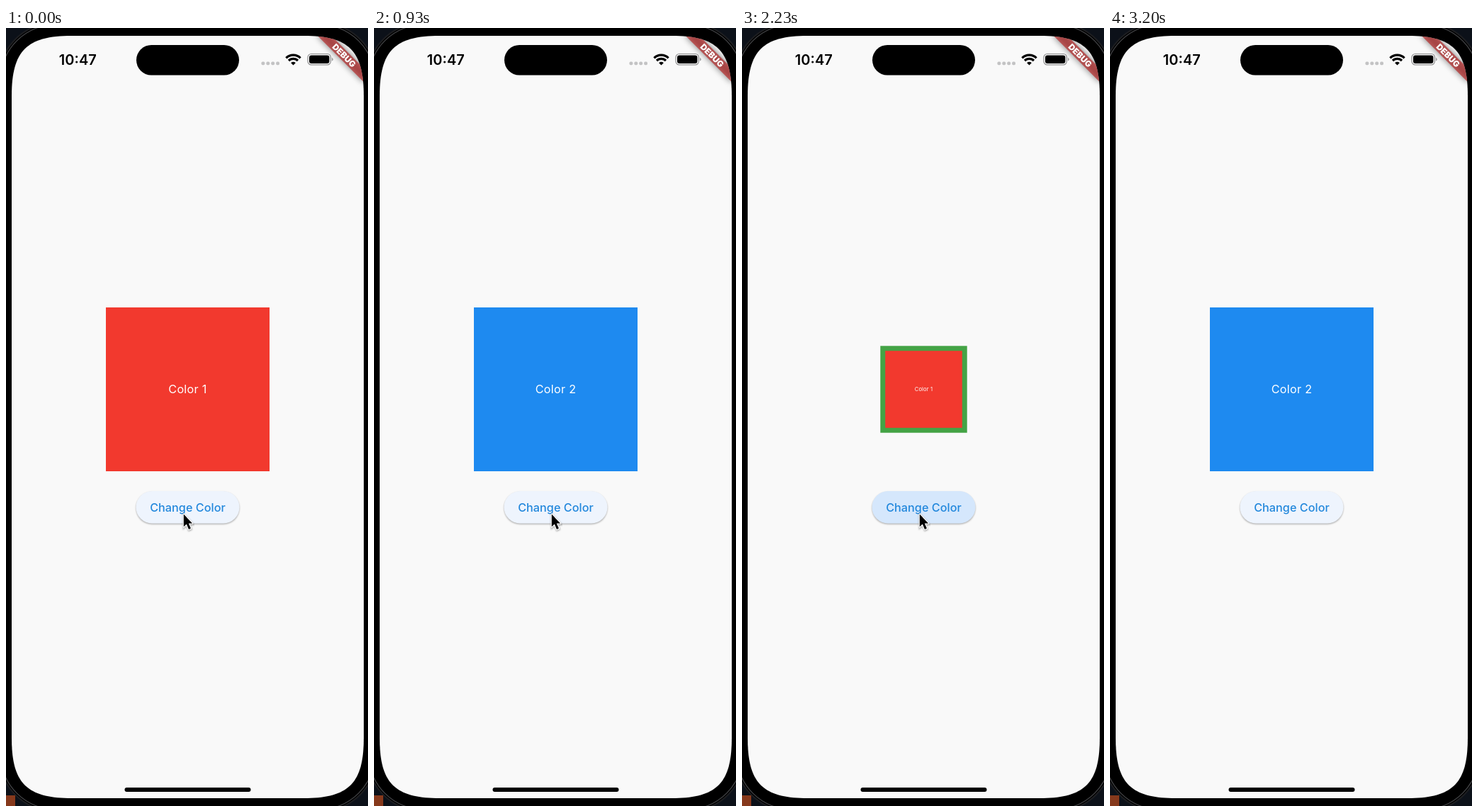
An HTML page that plays this animation: 511 by 1097 pixels, repeating every 3930 ms.

```html
<!DOCTYPE html>
<html lang="en">
<head>
<meta charset="utf-8">
<title>Change Color</title>
<style>
  html, body { margin: 0; width: 100%; height: 100%; overflow: hidden; background: #000; }
  svg { display: block; width: 100%; height: 100%; }
  text { font-family: Inter, "Open Sans", sans-serif; text-anchor: middle; }
  .label { font-size: 16.15px; letter-spacing: .32px; fill: #fff; }
  .action { font-size: 16.15px; font-weight: 500; letter-spacing: .06px; fill: #2187dc; }
  .clock { font-size: 20px; font-weight: 600; }
  .debug { font-size: 11.8px; font-weight: 900; fill: #fff; }
</style>
</head>
<body>
<svg viewBox="0 0 511 1097" xmlns="http://www.w3.org/2000/svg">
  <defs>
    <clipPath id="screenClip">
      <path id="screen" d="M8 96C8 32 29 11 93 11H420C484 11 505 32 505 96V1001C505 1065 484 1086 420 1086H93C29 1086 8 1065 8 1001Z"/>
    </clipPath>
    <clipPath id="buttonClip"><rect x="183.5" y="653" width="146" height="45.5" rx="22.75"/></clipPath>
    <filter id="soft" x="-50%" y="-200%" width="200%" height="500%"><feGaussianBlur stdDeviation="4.6"/></filter>
    <filter id="lift" x="-20%" y="-30%" width="140%" height="170%"><feGaussianBlur stdDeviation="1"/></filter>
  </defs>

  <!-- desktop and phone body -->
  <rect width="511" height="1097" fill="#0c1119"/>
  <rect y="1082" width="13" height="15" fill="#86391c"/>
  <rect x="-11" y="-8" width="535" height="1113" rx="82" fill="#000" stroke="#1d1e21" stroke-width="2"/>
  <rect x="-8" y="-5" width="529" height="1107" rx="79" fill="none" stroke="#46474a" stroke-width="1.2"/>
  <use href="#screen" fill="#f9f9f9"/>

  <!-- status bar -->
  <text class="clock" x="101.3" y="51.8">10:47</text>
  <rect x="184" y="24" width="145" height="42.5" rx="21.2"/>
  <g fill="#c3c3c4">
    <rect x="360.5" y="47.4" width="4.8" height="4.8" rx="1.8"/>
    <rect x="367.4" y="47.4" width="4.8" height="4.8" rx="1.8"/>
    <rect x="374.3" y="47.4" width="4.8" height="4.8" rx="1.8"/>
    <rect x="381.2" y="47.4" width="4.8" height="4.8" rx="1.8"/>
  </g>
  <g fill="none" stroke="#000" stroke-width="3.2">
    <path d="M395.4 42.4A14.3 14.3 0 0 1 415.6 42.4M399 46A9.2 9.2 0 0 1 412 46"/>
    <path d="M402.2 49.2A4.7 4.7 0 0 1 408.8 49.2L405.5 52.5Z" fill="#000" stroke="none"/>
  </g>
  <rect x="426" y="36.5" width="32.4" height="15.4" rx="4.9" fill="none" stroke="#8f8f90" stroke-width="1.2"/>
  <rect x="428" y="38.5" width="28.4" height="11.4" rx="3.2"/>
  <path d="M459.9 41.6Q461.8 42.6 461.8 44.2T459.9 46.8Z" fill="#a0a0a1"/>
  <rect x="167.5" y="1071" width="178" height="6" rx="3"/>

  <!-- corner ribbon -->
  <g clip-path="url(#screenClip)">
    <g transform="translate(505 11) rotate(45)">
      <rect x="-46.1" y="32.3" width="92.2" height="13.8" fill="#000" opacity=".5" filter="url(#soft)"/>
      <rect x="-46.1" y="32.3" width="92.2" height="13.8" fill="#b71c1c" opacity=".627"/>
      <text class="debug" x="0" y="43.4">DEBUG</text>
    </g>
  </g>

  <g id="oldCard"><rect x="-115.5" y="-115.5" width="231" height="231"/><text class="label" y="5.8"></text></g>
  <g id="newCard"><rect x="-115.5" y="-115.5" width="231" height="231"/><text class="label" y="5.8"></text></g>

  <!-- button -->
  <rect x="183.5" y="654.3" width="146" height="45.5" rx="22.75" opacity=".3" filter="url(#lift)"/>
  <g clip-path="url(#buttonClip)">
    <rect x="183" y="652" width="147" height="47" fill="#eef4fd"/>
    <rect id="glow" x="183" y="652" width="147" height="47" fill="#1e8af0"/>
    <circle id="ripple" fill="#1e8af0"/>
  </g>
  <text class="action" x="256.5" y="681.6">Change Color</text>

  <g id="cursor">
    <path d="M0 0V17.8L4 14.1L7.2 21.4L10.1 20.1L7 13H12.3Z" transform="translate(.3 1.2)" stroke="#000" stroke-width="3" opacity=".3" filter="url(#lift)"/>
    <path d="M0 0V17.8L4 14.1L7.2 21.4L10.1 20.1L7 13H12.3Z" stroke="#fff" stroke-width="2.4" stroke-linejoin="round" paint-order="stroke"/>
  </g>
</svg>
<script>
const LOOP = 3930;
const SWITCH = 500;
const HOLD = 120;
const TAPS = [269, 1110, 1996, 2695];
const COLORS = ['#f2392e', '#1e8af0', '#44a345'];
const CENTER = { x: 256.5, y: 675.8 };
const POINTER = { x: 250.8, y: 685.5 };
const OVERLAY = 0.125;

const $ = id => document.getElementById(id);
const clamp = v => Math.min(1, Math.max(0, v));
const lerp = (a, b, k) => a + (b - a) * k;
const set = (el, attrs) => Object.entries(attrs).forEach(([k, v]) => el.setAttribute(k, v));

// cubic-bezier(.25, .1, .25, 1)
function ease(x) {
  let lo = 0, hi = 1, s = x;
  for (let i = 0; i < 20; i++) {
    s = (lo + hi) / 2;
    const u = 1 - s;
    if (0.75 * u * s + s ** 3 < x) lo = s; else hi = s;
  }
  const u = 1 - s;
  return 0.3 * u * u * s + 3 * u * s * s + s ** 3;
}

function drawCard(id, index, scale) {
  const card = $(id);
  const n = (index + COLORS.length) % COLORS.length;
  set(card, {
    transform: `translate(256.5 509.5) scale(${scale})`,
    visibility: scale > 0.001 ? 'visible' : 'hidden'
  });
  card.firstChild.setAttribute('fill', COLORS[n]);
  card.lastChild.textContent = `Color ${n + 1}`;
}

function drawCards(t) {
  const count = TAPS.filter(tap => t >= tap).length;
  const k = count ? clamp((t - TAPS[count - 1]) / SWITCH) : 1;
  drawCard('oldCard', count - 1, 1 - k);
  drawCard('newCard', count, k);
}

function drawInk(t) {
  const up = TAPS.find(tap => t >= tap - HOLD && t < tap + 400);
  if (up === undefined) {
    set($('glow'), { opacity: 0 });
    set($('ripple'), { opacity: 0 });
    return;
  }
  const held = Math.min(t - up + HOLD, HOLD);
  const after = Math.max(0, t - up);
  const spread = ease(clamp(held / 1000 + after / 225));
  const fade = clamp(held / 75) * (1 - clamp((after - 225) / 150));
  set($('glow'), { opacity: OVERLAY * clamp(held / 200 - after / 200) });
  set($('ripple'), {
    cx: lerp(POINTER.x, CENTER.x, spread),
    cy: lerp(POINTER.y, CENTER.y, spread),
    r: lerp(23, 82, spread),
    opacity: OVERLAY * fade
  });
}

function drawCursor(t) {
  const k = clamp((t - 2930) / 250);
  set($('cursor'), {
    transform: `translate(${POINTER.x - 300 * k * k} ${POINTER.y - 25 * k * k})`,
    visibility: k < 1 ? 'visible' : 'hidden'
  });
}

const start = performance.now();
function draw() {
  const t = (performance.now() - start) % LOOP;
  drawCards(t);
  drawInk(t);
  drawCursor(t);
  requestAnimationFrame(draw);
}
draw();
</script>
</body>
</html>
```
